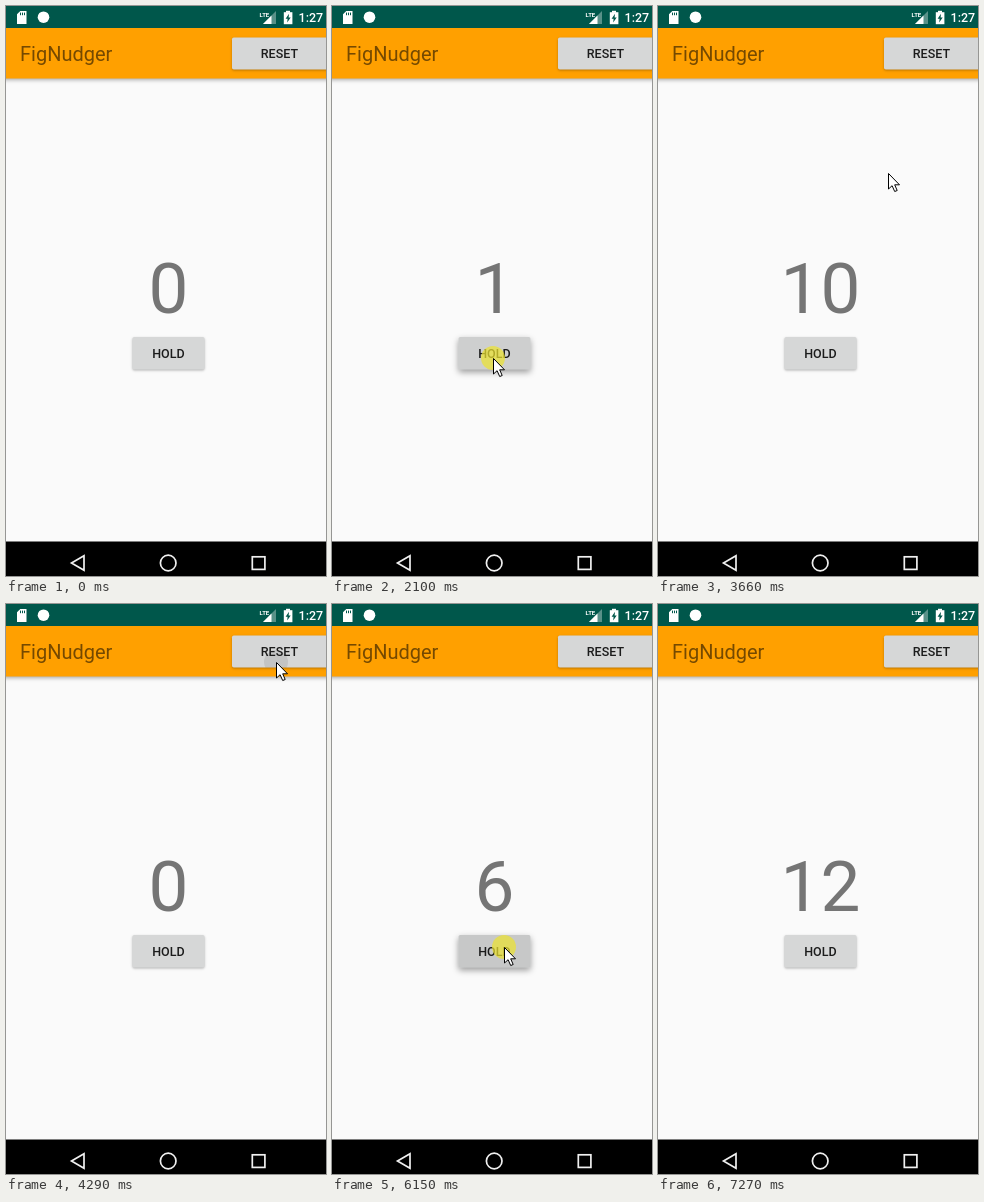
Recreate the animation shown at these times as an HTML page with a canvas. Size 320 by 570 pixels, loop 8810 ms.

```html
<!DOCTYPE html>
<html lang="en">
<head>
<meta charset="utf-8">
<title>Hold counter</title>
<style>
html, body { margin: 0; width: 100%; height: 100%; overflow: hidden; background: #fafafa; }
canvas { display: block; width: 320px; height: 570px; }
</style>
</head>
<body>
<canvas id="stage"></canvas>
<script>
const W = 320, H = 570, LOOP = 8810;
const canvas = document.getElementById('stage');
const ctx = canvas.getContext('2d');
const scale = window.devicePixelRatio || 1;
canvas.width = W * scale;
canvas.height = H * scale;

const FACE = '#d6d7d7';
const HOLD = { x: 126.5, y: 331, w: 72, h: 32.5, label: 'HOLD', cx: 162.4, base: 352 };
const RESET = { x: 226, y: 31.5, w: 98, h: 32, label: 'RESET', cx: 273.4, base: 52.3 };

// Moments at which the counter goes up by one
const FIRST = [2010, 2170, 2250, 2400, 2490, 2640, 2720, 2790, 2870, 3040];
const SECOND = [5600, 5690, 5840, 5925, 6010, 6150, 6240, 6310, 6480, 6556, 6632, 6708];
const RESET_AT = 4290;

const HOLDS = [
  { down: 2010, up: 3270, rise: 4, fall: 3 },
  { down: 5600, up: 6784, rise: 2, fall: 2 }
];
const TOUCHES = [[1930, 3100], [4120, 4290], [5440, 6784]];

// Pointer moves: start, end, number of positions, from, bend, to
const MOVES = [
  { t0: 1140, t1: 1610, n: 7, from: [251, 299], bend: [186, 362], to: [161, 352], ease: u => 1 - (1 - u) ** 2 },
  { t0: 3340, t1: 3890, n: 8, from: [161, 352], bend: [222, 190], to: [270, 58], ease: smooth },
  { t0: 4354, t1: 4980, n: 9, from: [270, 58], bend: [222, 210], to: [173, 343], ease: smooth },
  { t0: 5060, t1: 5060, n: 1, from: [172, 343], bend: [172, 343], to: [172, 343], ease: smooth },
  { t0: 7180, t1: 7180, n: 1, from: [305, 407], bend: [305, 407], to: [305, 407], ease: smooth }
];
const POINTER_OFF = 7270;

function smooth(u) { return u * u * (3 - 2 * u); }

function pointerAt(t) {
  if (t >= POINTER_OFF) return null;
  const m = MOVES.filter(move => t >= move.t0).pop();
  if (!m) return null;
  const step = t >= m.t1 ? 1 : Math.floor((t - m.t0) / (m.t1 - m.t0) * (m.n - 1)) / (m.n - 1);
  const u = m.ease(step), v = 1 - u;
  return [0, 1].map(i => Math.round(v * v * m.from[i] + 2 * u * v * m.bend[i] + u * u * m.to[i]));
}

function countAt(t) {
  const ticks = t < RESET_AT ? FIRST : SECOND;
  return ticks.filter(tick => t >= tick).length;
}

function pressAt(t) {
  const p = HOLDS.filter(hold => t >= hold.down).pop();
  if (!p) return 0;
  const steps = from => Math.floor((t - from) / 80) + 1;
  return t < p.up ? Math.min(1, steps(p.down) / p.rise) : Math.max(0, 1 - steps(p.up) / p.fall);
}

function rect(color, x, y, w, h) {
  ctx.fillStyle = color;
  ctx.fillRect(x, y, w, h);
}

function disc(color, x, y, r) {
  ctx.fillStyle = color;
  ctx.beginPath();
  ctx.arc(x, y, r, 0, Math.PI * 2);
  ctx.fill();
}

function trace(points) {
  ctx.beginPath();
  points.forEach(([x, y]) => ctx.lineTo(x, y));
  ctx.closePath();
}

function poly(color, points) {
  ctx.fillStyle = color;
  trace(points);
  ctx.fill();
}

function text(str, x, y, size, color, align = 'left', weight = 400) {
  ctx.font = `${weight} ${size}px Roboto, sans-serif`;
  ctx.fillStyle = color;
  ctx.textAlign = align;
  ctx.fillText(str, x, y);
}

function shadow(alpha, blur, dy) {
  ctx.shadowColor = `rgba(0,0,0,${alpha})`;
  ctx.shadowBlur = blur * scale;
  ctx.shadowOffsetY = dy * scale;
}

function button(b, lift, overlay) {
  ctx.save();
  ctx.beginPath();
  ctx.roundRect(b.x, b.y, b.w, b.h, 1.8);
  ctx.fillStyle = FACE;
  shadow(0.28 + 0.1 * lift, 2.5 + 4 * lift, 1 + 1.8 * lift);
  ctx.fill();
  shadow(0, 0, 0);
  ctx.clip();
  overlay();
  ctx.restore();
  text(b.label, b.cx, b.base, 12.5, 'rgba(0,0,0,.87)', 'center', 500);
}

function statusBar() {
  rect('#00574b', 0, 0, W, 22);
  // Memory card
  poly('#fff', [[14.3, 5], [20.5, 5], [20.5, 18], [11, 18], [11, 8.3]]);
  for (let i = 0; i < 3; i++) rect('#00574b', 14 + i * 2, 6.6, 1, 2.6);
  disc('#fff', 37.5, 11.2, 5.8);
  // Signal
  text('LTE', 253.5, 10.5, 6, '#fff', 'left', 700);
  poly('rgba(255,255,255,.35)', [[270, 5], [270, 18], [257, 18]]);
  poly('#fff', [[265.5, 9.5], [265.5, 18], [257, 18]]);
  // Battery
  rect('#fff', 280, 4.8, 4, 2);
  rect('#fff', 277.8, 6.2, 8.6, 12);
  poly('#00574b', [[283, 7.8], [279.6, 12.8], [281.6, 12.8], [281.2, 16.6], [284.7, 11.5], [282.6, 11.5]]);
  text('1:27', 317.2, 16.3, 12.5, '#fff', 'right', 500);
}

function toolbar(t) {
  ctx.save();
  shadow(0.32, 4, 1.5);
  rect('#ffa000', -8, 22, W + 16, 50.5);
  ctx.restore();
  text('FigNudger', 14, 55.4, 20, 'rgba(0,0,0,.54)');
  const k = Math.floor((t - RESET_AT) / 75);
  button(RESET, 0, () => {
    if (k >= 0 && k < 3) disc(`rgba(0,0,0,${0.09 - k * 0.025})`, 270, 58, 12 + k * 36);
  });
}

function navBar() {
  rect('#000', 0, 535.5, W, H - 535.5);
  ctx.strokeStyle = '#f0f0f0';
  ctx.lineWidth = 1.7;
  trace([[65.5, 557], [78, 549.8], [78, 564.2]]);
  ctx.stroke();
  ctx.beginPath();
  ctx.arc(162.2, 557, 7.8, 0, Math.PI * 2);
  ctx.stroke();
  ctx.strokeRect(246.3, 550.8, 12.6, 12.6);
}

function pointer(x, y) {
  ctx.save();
  ctx.translate(x + 0.5, y + 0.5);
  trace([[0, 0], [0, 15.5], [3.6, 12.2], [6.2, 18], [8.7, 17], [6.2, 11.3], [11, 11.3]]);
  ctx.fillStyle = '#fff';
  ctx.fill();
  ctx.strokeStyle = '#000';
  ctx.lineWidth = 1;
  ctx.stroke();
  ctx.restore();
}

function draw(t) {
  ctx.setTransform(scale, 0, 0, scale, 0, 0);
  rect('#fafafa', 0, 0, W, H);
  toolbar(t);
  statusBar();
  text(countAt(t), 162.4, 306.5, 71, '#757575', 'center');
  const press = pressAt(t);
  button(HOLD, Math.min(1, press * 2), () => {
    rect(`rgba(0,0,0,${0.07 * press})`, HOLD.x, HOLD.y, HOLD.w, HOLD.h);
  });
  navBar();
  const at = pointerAt(t);
  if (!at) return;
  if (TOUCHES.some(([a, b]) => t >= a && t < b)) disc('rgba(236,226,48,.72)', ...at, 12);
  pointer(...at);
}

const start = performance.now();
function frame() {
  draw((performance.now() - start) % LOOP);
  requestAnimationFrame(frame);
}
frame();
</script>
</body>
</html>
```
